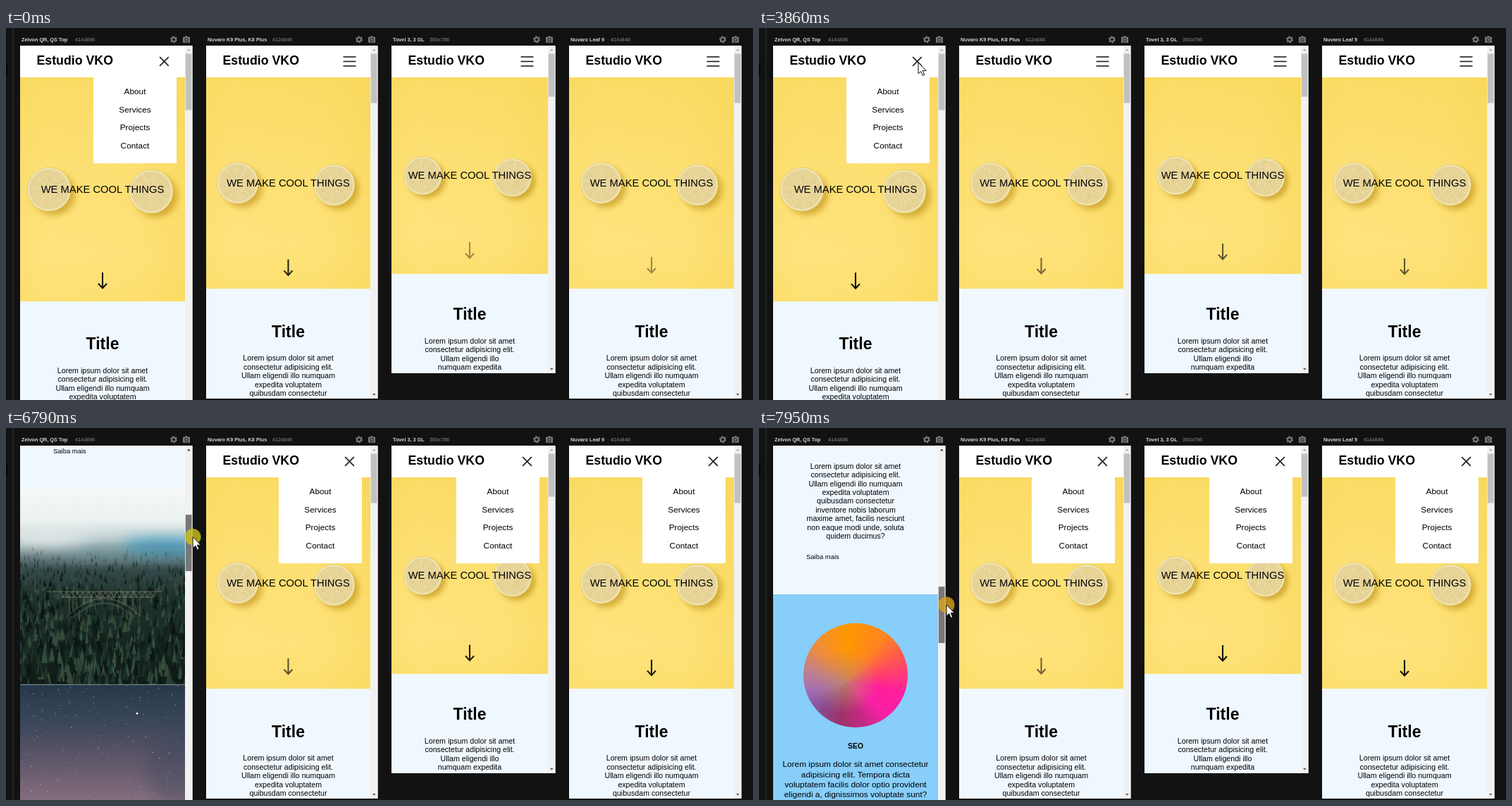
An HTML page for the animation above (8000 ms loop, 1060 by 528 pixels).

```html
<!DOCTYPE html>
<html lang="en">
<head>
<meta charset="utf-8">
<title>Responsive preview</title>
<style>
  html, body { margin: 0; width: 100%; height: 100%; overflow: hidden; background: #121212; }
  body > svg { display: block; width: 1060px; height: 528px; }
  text { font-family: "Liberation Sans", Arial, sans-serif; }
  .art {
    width: 148px; height: 148px; border-radius: 50%;
    background:
      radial-gradient(circle at 40% 56%, #c58468dd 0, #c5846800 38%),
      conic-gradient(from 0deg at 42% 56%, #ff9800, #ff8420 40deg, #ff4a60 72deg, #ff1f9c 100deg,
        #fb1fa6 130deg, #c02a80 160deg, #9c3168 190deg, #8a4a90 222deg, #a06cb4 255deg,
        #c08090 285deg, #f08c38 320deg, #ff9800);
  }
</style>
</head>
<body>
<script>
const LOOP = 8000, TOGGLE = 3990, PRESS = 5350;
const LOREM = ['Lorem ipsum dolor sit amet', 'consectetur adipisicing elit.', 'Ullam eligendi illo numquam',
  'expedita voluptatem', 'quibusdam consectetur', 'inventore nobis laborum',
  'maxime amet, facilis nesciunt', 'non eaque modi unde, soluta', 'quidem ducimus?'];
const NARROW = [...LOREM.slice(0, 2), 'Ullam eligendi illo', 'numquam expedita'];
const ITEMS = ['About', 'Services', 'Projects', 'Contact'];

const panels = [
  { x: 20, r: 254, b: 540, hero: 388, title: 448, thumb: 80, name: 'Zelvon QR, QS Top', size: '414x896', sx: 98, phase: .39, open: true },
  { x: 284, r: 517, b: 526, hero: 370, title: 430.5, thumb: 70, name: 'Nuvaro K9 Plus, K8 Plus', size: '412x846', sx: 378, phase: .65 },
  { x: 547, r: 769, b: 490, hero: 349, title: 406, thumb: 61, name: 'Tovel 3, 3 GL', size: '393x786', sx: 601, phase: .05, lines: NARROW },
  { x: 799, r: 1033, b: 526, hero: 370, title: 430.5, thumb: 70, name: 'Nuvaro Leaf 9', size: '414x846', sx: 858, phase: .05 }
];

// time, x, y
const pointer = [[200, 172, 545], [500, 178, 300], [780, 184, 163], [1000, 186, 150], [1200, 188, 125],
  [1380, 190, 92], [1750, 191, 90], [2050, 193, 116], [2250, 196, 142], [2430, 200, 168], [2570, 201, 172],
  [2800, 203, 165], [3020, 208, 120], [3250, 214, 68], [3600, 225, 50], [3860, 226, 49], [4130, 227, 50],
  [4700, 250, 60], [5200, 261, 67], [5560, 262, 68], [6510, 264, 139], [7250, 267, 180], [7950, 266, 251]];
const scrolling = [[5560, 0], [6510, 478], [7250, 754], [7950, 1270]];

let seed = 7;
const rnd = (a = 0, b = 1) => {
  seed = (seed * 16807) % 2147483647;
  return a + (b - a) * seed / 2147483647;
};
const pick = list => list[Math.floor(rnd(0, list.length))];

function el(tag, attrs, parent, content) {
  const e = document.createElementNS('http://www.w3.org/2000/svg', tag);
  set(e, attrs);
  if (content !== undefined) e.textContent = content;
  if (parent) parent.appendChild(e);
  return e;
}
function set(e, attrs) { for (const k in attrs) e.setAttribute(k, attrs[k]); }
const rect = (g, x, y, width, height, fill, more) => el('rect', { x, y, width, height, fill, ...more }, g);
const path = (g, d, more) => el('path', { d, fill: 'none', ...more }, g);
const text = (g, str, x, cy, size, more) =>
  el('text', { x, y: cy + size * .36, 'font-size': size, 'text-anchor': 'middle', ...more }, g, str);
const haze = (g, cx, cy, rx, ry, fill, opacity) =>
  el('ellipse', { cx, cy, rx, ry, fill, opacity, filter: 'url(#mist)' }, g);

function track(t, keys) {
  if (t <= keys[0][0]) return keys[0].slice(1);
  for (let i = 1; i < keys.length; i++) {
    const [a, ...p] = keys[i - 1], [b, ...q] = keys[i];
    if (t < b) return p.map((v, j) => v + (q[j] - v) * (t - a) / (b - a));
  }
  return keys[keys.length - 1].slice(1);
}

const stage = el('svg', { width: 1060, height: 528, viewBox: '0 0 1060 528' }, document.body);
const defs = el('defs', {}, stage);
function gradient(id, stops, attrs) {
  const g = el('linearGradient', { id, x1: 0, y1: 0, x2: 0, y2: 1, ...attrs }, defs);
  stops.forEach(([offset, color, op = 1]) => el('stop', { offset, 'stop-color': color, 'stop-opacity': op }, g));
}
function blur(id, dev) {
  const f = el('filter', { id, x: '-50%', y: '-100%', width: '200%', height: '300%' }, defs);
  el('feGaussianBlur', { stdDeviation: dev }, f);
}
blur('soft', 4.5);
blur('mist', 11);
gradient('yellow', [[0, '#fadc66'], [.4, '#fde074'], [.8, '#fee37c'], [1, '#fde072']]);
gradient('edge', [[0, '#f5d044', .12], [.15, '#f5d044', 0], [.7, '#f5d044', .06], [1, '#f5d044', .32]], { x2: 1, y2: 0 });
gradient('forest', [[0, '#f5f8f6'], [.17, '#eaf1f0'], [.27, '#bfcdce'], [.34, '#71878a'], [.42, '#34494a'], [.55, '#1f332d'], [1, '#101b17']]);
gradient('night', [[0, '#26384b'], [.2, '#3c475a'], [.4, '#62586b'], [.55, '#7d697a'], [.68, '#8f7a85'], [1, '#8f7a85']]);
gradient('snow', [[0, '#e0c9b6'], [.15, '#bcacae'], [.5, '#978b98'], [.8, '#7c7280'], [1, '#4a444e']]);

function lemon(g, cx, cy, r, turn) {
  el('circle', { cx: cx + r * .22, cy: cy + r * .2, r: r * .98, fill: '#b98a10', opacity: .6, filter: 'url(#soft)' }, g);
  el('circle', { cx, cy, r, fill: '#f0e4b4', stroke: '#e3c763', 'stroke-width': .8 }, g);
  el('circle', { cx, cy, r: r * .91, fill: '#e6d396' }, g);
  for (let i = 0; i < 60; i++) {
    const a = rnd(0, 6.283), d = r * rnd(.3, .85);
    path(g, `M${cx + d * Math.cos(a)} ${cy + d * Math.sin(a)}l${-4 * Math.cos(a)} ${-4 * Math.sin(a)}`,
      { stroke: i % 2 ? '#f0e2b2' : '#d9c07a', 'stroke-width': 1, opacity: .7 });
  }
  let d = '';
  for (let i = 0; i < 10; i++) {
    const a = turn + i * Math.PI / 5;
    d += `M${cx} ${cy}L${cx + r * .9 * Math.cos(a)} ${cy + r * .9 * Math.sin(a)}`;
  }
  path(g, d, { stroke: '#f1e6bd', 'stroke-width': 1, opacity: .5 });
  el('circle', { cx, cy, r: 2, fill: '#f1e6bd' }, g);
}

function hero(g, p) {
  const h = p.hero - 70, w = p.r - p.x, k = h / 318;
  rect(g, p.x, 70, w, h, 'url(#yellow)');
  rect(g, p.x, 70, w, h, 'url(#edge)');
  const art = el('g', { transform: `translate(${p.cx} 70) scale(${k})` }, g);
  lemon(art, -76, 159, 31, .2);
  lemon(art, 69, 162, 31, .5);
  text(g, 'WE MAKE COOL THINGS', p.cx, 70 + h / 2 - .5, 14.75);
  p.arrow = path(g, 'M0 0V22.5M-6 15.8L0 22.3 6 15.8', { stroke: '#000', 'stroke-width': 2.1 });
}

function section(g, p, top, titleY) {
  rect(g, p.x, top, p.r - p.x, 279, '#f0f8ff');
  text(g, 'Title', p.cx, titleY, 23, { 'font-weight': 700 });
  (p.lines || LOREM).forEach((s, i) => text(g, s, p.cx, titleY + 38 + i * 12.4, 10.65));
  text(g, 'Saiba mais', p.x + 47, titleY + 167, 9.47, { 'text-anchor': 'start' });
}

function forest(g, top) {
  const f = el('svg', { x: 20, y: top, width: 234, height: 280 }, g);
  rect(f, 0, 0, 234, 280, 'url(#forest)');
  haze(f, 205, 84, 60, 9, '#0f83b5', .9);
  haze(f, 110, 92, 50, 8, '#4d8796', .5);
  haze(f, 40, 72, 60, 10, '#eef3f2', .8);
  const tones = ['#0c1613', '#14211c', '#1c3028', '#263f34', '#34503f', '#3c4a38', '#101d1a'];
  for (let i = 0; i < 950; i++) {
    const q = i / 950, y = 90 + q * 180 + rnd(-8, 8), h = 7 + q * 18 * rnd(.5, 1.1), w = h * rnd(.14, .24);
    path(f, `M${rnd(-4, 238)} ${y}l${w} ${h}h${-2 * w}z`,
      { fill: pick(tones), opacity: Math.min(.95, .2 + q * 3) });
  }
  haze(f, 150, 97, 120, 4, '#a9bcbf', .45);
  let truss = 'M38 148H202M57 156H188M57 148';
  for (let x = 57; x < 188; x += 8) truss += `L${x + 4} 156L${x + 8} 148`;
  path(f, truss, { stroke: '#9d937d', 'stroke-width': .7, opacity: .8 });
  let arch = 'M66 184Q118 132 170 182M74 186Q118 144 162 184';
  for (let x = 70; x <= 170; x += 10) arch += `M${x} 156V${159 + (x - 118) ** 2 * .0092}`;
  path(f, arch, { stroke: '#968b75', 'stroke-width': .7, opacity: .8 });
  path(f, 'M132 245l3 8-3 6 4 10', { stroke: '#7196a0', 'stroke-width': 1.2, opacity: .6 });
}

function night(g, top) {
  const n = el('svg', { x: 20, y: top, width: 234, height: 279 }, g);
  rect(n, 0, 0, 234, 279, 'url(#night)');
  haze(n, 225, 120, 45, 50, '#3a465a', .4);
  for (let i = 0; i < 230; i++)
    el('circle', { cx: rnd(0, 234), cy: rnd(0, 1) ** 1.3 * 165, r: rnd(.25, .65), fill: '#fff', opacity: rnd(.2, .75) }, n);
  el('circle', { cx: 166, cy: 41, r: 1.4, fill: '#fff' }, n);

  const ridge = [[0, 181], [20, 172], [40, 173], [55, 180], [76, 168], [92, 185], [110, 182], [130, 180],
    [150, 174], [165, 181], [185, 173], [206, 177], [234, 183]];
  path(n, `M${ridge.join('L')}V279H0Z`, { fill: 'url(#snow)' });
  // shaded face falling away from each crest
  ridge.forEach(([x, y]) => {
    const s = rnd(28, 55);
    path(n, `M${x} ${y + 1}l${s * .22} ${s * .3} ${s * .05} ${s * .25} ${s * .5} ${s * .5} ${-s * .7} ${-s * .15} ${-s * .3} ${s * .1} ${s * .15} ${-s * .5}z`,
      { fill: '#5a505c', opacity: .65 });
  });
  for (let i = 0; i < 170; i++) {
    const x = rnd(-5, 230), y = rnd(182, 255), s = rnd(4, 15);
    path(n, `M${x} ${y}l${s} ${s * .8}l${-s * .7} ${-s * .35}z`,
      { fill: pick(['#463f4a', '#5f5562', '#3a343e', '#cfc0bf', '#b3a7b0']), opacity: .65 });
  }
  path(n, 'M0 279V266L40 270 90 268 130 260 170 248 234 236V279Z', { fill: '#221e24', opacity: .85 });
  for (let i = 0; i < 130; i++) {
    const x = rnd(0, 238), h = rnd(6, 18), base = 284 - rnd(0, 1) * Math.max(4, x - 90) * .22;
    path(n, `M${x} ${base - h}l${h * .18} ${h + 8}h${-h * .36}z`, { fill: i % 3 ? '#141217' : '#252128' });
  }
  rect(g, 20, top - .5, 234, 1, '#7d8589');
}

function services(g) {
  rect(g, 20, 1506, 234, 600, '#87cefa');
  const fo = el('foreignObject', { x: 63, y: 1547, width: 148, height: 148 }, g);
  const art = document.createElement('div');
  art.className = 'art';
  fo.appendChild(art);
  text(g, 'SEO', 137, 1721, 10.4, { 'font-weight': 700 });
  ['Lorem ipsum dolor sit amet consectetur', 'adipisicing elit. Tempora dicta',
    'voluptatem facilis dolor optio provident', 'eligendi a, dignissimos voluptate sunt?']
    .forEach((s, i) => text(g, s, 137, 1747 + i * 14.4, 11.83));
}

function toolbar(p, R) {
  text(stage, p.name, p.x + 2, 16, 7.25, { 'text-anchor': 'start', 'font-weight': 700, fill: '#d4d4d4' });
  text(stage, p.size, p.sx, 16, 7.3, { 'text-anchor': 'start', fill: '#8c8c8c' });
  const g = el('g', { transform: `translate(${R - 26.5} 16.3)`, fill: 'none', stroke: '#777' }, stage);
  el('circle', { r: 2.9, 'stroke-width': 2 }, g);
  el('circle', { r: 4.2, 'stroke-width': 1.7, 'stroke-dasharray': '2.2 2.2' }, g);
  const c = el('g', { transform: `translate(${R - 8.5} 16.3)` }, stage);
  path(c, 'M-5-3.5H-2.4L-1.4-4.8H1.4L2.4-3.5H5V4.5H-5Z', { fill: '#777' });
  el('circle', { cy: .5, r: 2.3, fill: '#777', stroke: '#121212', 'stroke-width': 1 }, c);
}

function scrollbar(p, R) {
  rect(stage, p.r, 25, R - p.r, p.b - 25, '#f1f1f1');
  p.up = path(stage, `M${p.r + 3} 32.3h4.6l-2.3-2.6z`, { fill: '#a3a3a3' });
  path(stage, `M${p.r + 3} ${p.b - 7}h4.6l-2.3 2.6z`, { fill: '#505050' });
  p.bar = rect(stage, p.r + .8, 36.5, 8.7, p.thumb, '#c1c1c1');
}

function menu(g, p) {
  p.menu = el('g', {}, g);
  rect(p.menu, p.r - 130, 69, 118, 123, '#fff');
  p.pill = rect(p.menu, p.r - 119, 154, 95, 26, '#ff7f50', { rx: 13 });
  p.items = ITEMS.map((s, i) => text(p.menu, s, p.r - 71, 89.7 + i * 25.7, 11.83));
}

function build(p) {
  const R = p.r + 10.5;
  p.cx = (p.x + p.r) / 2;
  toolbar(p, R);
  rect(stage, p.x, 25, R - p.x, p.b - 25, '#fff', { rx: 1 });
  const view = el('svg', { x: p.x, y: 25, width: p.r - p.x, height: p.b - 25,
    viewBox: `${p.x} 25 ${p.r - p.x} ${p.b - 25}` }, stage);
  const g = p.page = el('g', {}, view);
  rect(g, p.x, 25, p.r - p.x, 45, '#fff');
  text(g, 'Estudio VKO', p.x + 23.5, 46, 17.75, { 'text-anchor': 'start', 'font-weight': 700 });
  section(g, p, p.hero, p.title);
  hero(g, p);
  if (p.open) {
    forest(g, 667);
    night(g, 947);
    section(g, p, 1226, 1286);
    services(g);
  }
  menu(g, p);
  const icon = el('g', { transform: `translate(${p.r - 29.5} 47.5)`, stroke: '#1c1c1c', 'stroke-width': 1.6 }, g);
  p.strokes = [-1, 0, 1].map(() => el('line', { x1: -9, x2: 9 }, icon));
  scrollbar(p, R);
}

rect(stage, 0, 0, 1060, 528, '#121212');
rect(stage, 9.5, 0, 1, 528, '#303030');
rect(stage, 0, 50, 2, 16, '#000');
panels.forEach(build);

const halo = el('circle', { r: 11.5 }, stage);
const cursor = el('g', { fill: '#fff', stroke: '#111', 'stroke-width': 1, 'stroke-linejoin': 'round' }, stage);
const arrow = path(cursor, 'M0 0V16L3.7 12.6 6.3 18.4 8.8 17.3 6.2 11.6H11.3Z', { fill: '#fff' });
const hand = path(cursor,
  'M-1.7 1.7Q-1.7 0 0 0T1.7 1.7V7.2Q4.3 6.3 4.7 8.2 7 7.4 7.5 9.3 9.8 8.8 9.8 11V15.5Q9.8 18 8 19.5V22H-1V20L-6 13.2Q-6.6 11.3-4.8 11.2L-1.7 13.8Z',
  { fill: '#fff' });

const smooth = v => { v = Math.min(1, Math.max(0, v)); return v * v * (3 - 2 * v); };

function draw(t) {
  const [px, py] = track(t, pointer), [offset] = track(t, scrolling);
  const toggled = t >= TOGGLE, morph = smooth((t - TOGGLE) / 260), held = t >= PRESS;
  const hot = !toggled && py >= 77 && py < 180 ? Math.floor((py - 77) / 25.75) : -1;

  panels.forEach((p, n) => {
    const open = !!p.open !== toggled, k = p.open ? 1 - morph : morph;
    p.menu.setAttribute('visibility', open ? 'visible' : 'hidden');
    p.strokes.forEach((s, i) => set(s, {
      transform: `translate(0 ${(i - 1) * 6.5 * (1 - k)}) rotate(${(1 - i) * 45 * k})`,
      opacity: i === 1 ? 1 - k : 1
    }));
    const u = .5 - .5 * Math.cos(2 * Math.PI * (t * .000822 + p.phase));
    set(p.arrow, { transform: `translate(${p.cx} ${p.hero - 45 + 4.5 * u})`, opacity: .37 + .6 * u });
    const row = n === 0 ? hot : -1;
    set(p.pill, { y: 77 + Math.max(0, row) * 25.7, opacity: row < 0 ? 0 : 1 });
    p.items.forEach((e, i) => e.setAttribute('fill', i === row ? '#fff' : '#000'));
  });

  const main = panels[0];
  main.page.setAttribute('transform', `translate(0 ${-offset})`);
  set(main.bar, { y: 36.5 + offset / 6.73, fill: held ? '#787878' : '#c1c1c1' });
  main.up.setAttribute('fill', offset ? '#222' : '#a3a3a3');

  cursor.setAttribute('transform', `translate(${px} ${py})`);
  arrow.setAttribute('opacity', hot < 0 ? 1 : 0);
  hand.setAttribute('opacity', hot < 0 ? 0 : 1);
  set(halo, { cx: px, cy: py, opacity: held ? .8 : 0, fill: t > 7700 ? '#d9a31c' : '#cfc21c' });
}

const start = performance.now();
function tick() {
  draw((performance.now() - start) % LOOP);
  requestAnimationFrame(tick);
}
tick();
</script>
</body>
</html>
```
